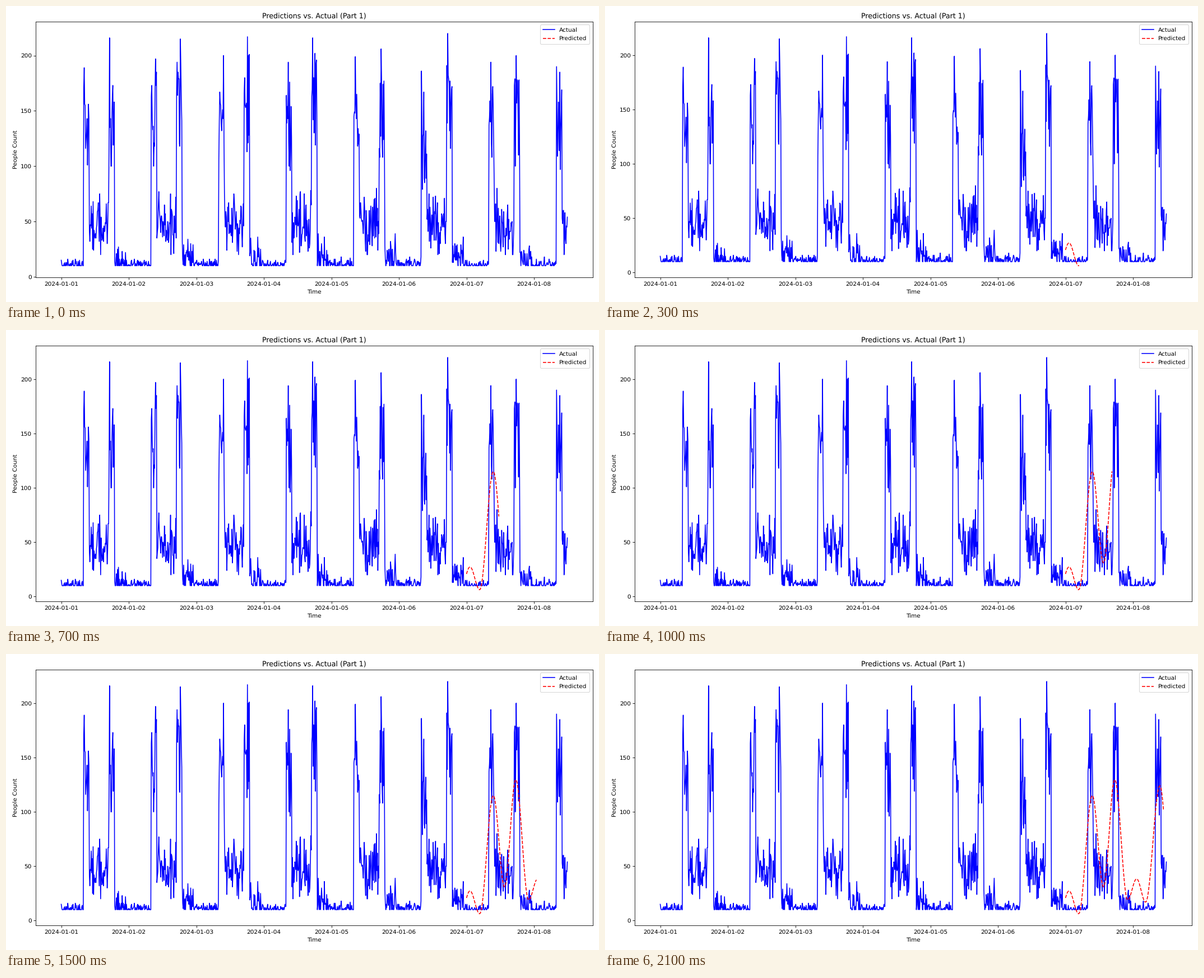
Animation, 1058 px wide and 529 px high, one loop 2.2 s. Source, as a matplotlib script:

```python
import matplotlib.pyplot as plt
import numpy as np
from matplotlib.animation import FuncAnimation

PER_HOUR = 6  # one sample every ten minutes
PER_DAY = 24 * PER_HOUR
COUNT = 1080
START = 6 * PER_DAY
STEP = 10
FRAMES = 22

rng = np.random.default_rng(24)

# Parts of a day: first hour, hours, mean, spread, lowest, highest count.
NIGHT = (0, 24, 10.5, 3, 10, 18)
MORNING = (8, 2, 142, 34, 79, 185)
WORK = (10, 7, 45, 14, 20, 80)
EVENING = (17, 2, 158, 40, 100, 205)
LATE = (19, 4, 17, 9, 10, 39)

MORNING_PEAKS = [189, 197, 200, 194, 199, 186, 194, 190]
EVENING_PEAKS = [216, 215, 217, 216, 206, 220, 200, 210]

# Crests and troughs of the forecast: day, count.
TURNS = [(-0.08, 8), (0.052, 27.3), (0.195, 6.3), (0.397, 115), (0.563, 31),
         (0.729, 129.6), (0.92, 19), (1.053, 38.4), (1.186, 17), (1.398, 124),
         (1.56, 30)]


def fill(day, part, peak=None):
    """Write random counts for one part of the day, optionally with a set peak."""
    hour, hours, mean, spread, low, high = part
    values = np.clip(rng.normal(mean, spread, hours * PER_HOUR), low, high)
    if peak:
        values[values.argmax()] = peak
    day[hour * PER_HOUR:(hour + hours) * PER_HOUR] = values


def actual_counts():
    days = np.zeros((8, PER_DAY))
    for day, morning, evening in zip(days, MORNING_PEAKS, EVENING_PEAKS):
        fill(day, NIGHT)
        fill(day, MORNING, morning)
        fill(day, WORK)
        fill(day, EVENING, evening)
        fill(day, LATE)
    return days.ravel()[:COUNT].round()


def forecast(t):
    """Cosine waves running from each turning point to the next."""
    at, level = np.array(TURNS).T
    i = np.searchsorted(at, t, side="right") - 1
    part = (t - at[i]) / (at[i + 1] - at[i])
    return level[i] + (level[i + 1] - level[i]) * (1 - np.cos(np.pi * part)) / 2


times = np.datetime64("2024-01-01T00:00") + 10 * np.arange(COUNT).astype("timedelta64[m]")
future = times[START:]
predicted = forecast(np.arange(COUNT - START) / PER_DAY)

fig, ax = plt.subplots(figsize=(14, 7), dpi=100)
ax.plot(times, actual_counts(), color="blue", label="Actual")
line, = ax.plot(future[:0], predicted[:0], color="red", linestyle="--", label="Predicted")
ax.set_title("Predictions vs. Actual (Part 1)")
ax.set_xlabel("Time")
ax.set_ylabel("People Count")
ax.legend(loc="upper right", labelspacing=0.55, borderpad=0.45)
fig.tight_layout()

# Scale the finished layout to the stage, 1058 by 529 pixels.
fig.set_dpi(1058 / 14)
plt.rcParams["text.hinting"] = "none"


def update(frame):
    shown = STEP * frame
    line.set_data(future[:shown], predicted[:shown])
    ax.relim()
    ax.autoscale_view()
    return line,


anim = FuncAnimation(fig, update, frames=FRAMES, interval=100, repeat=True)
plt.show()
```
